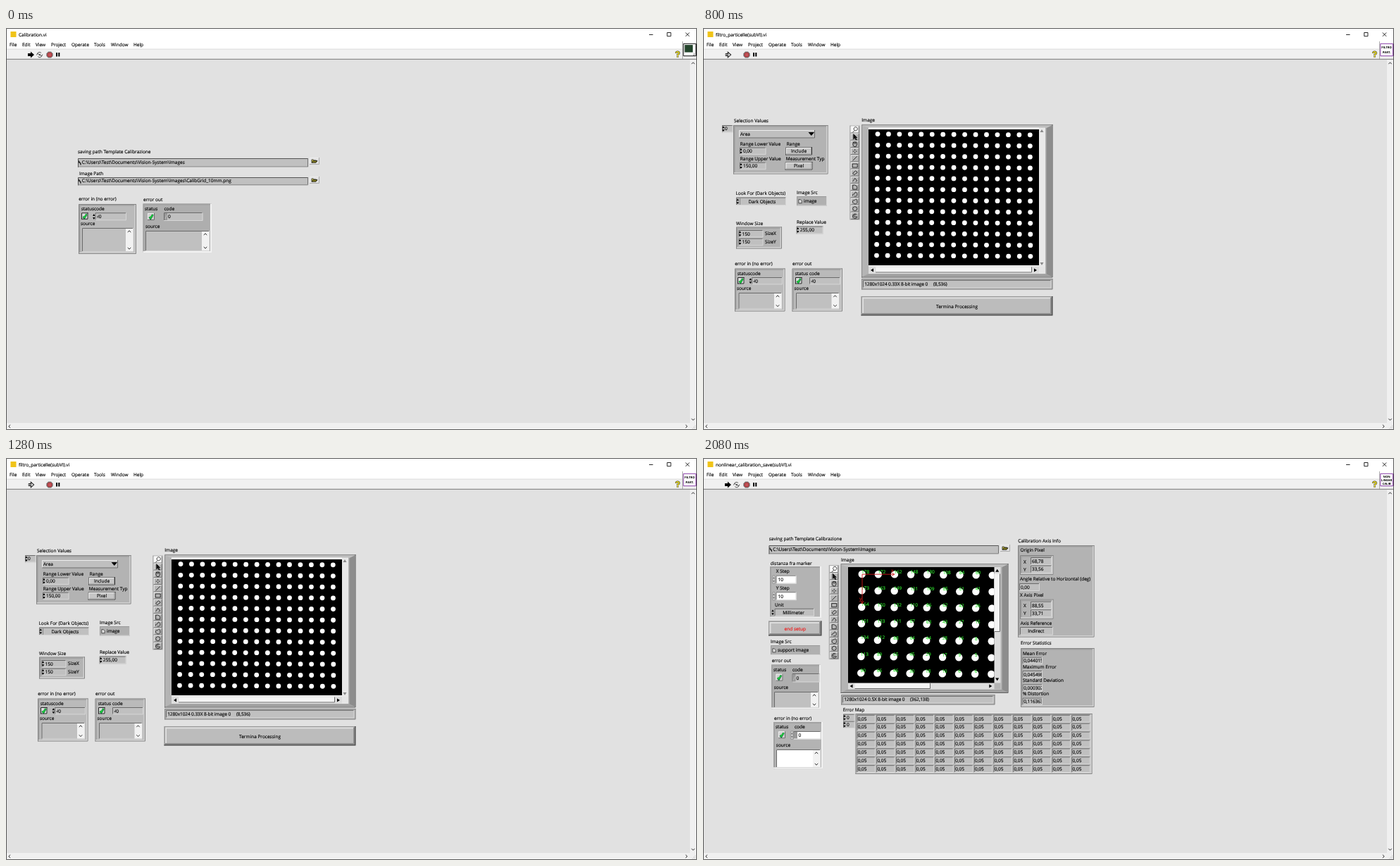
Recreate the animation shown at these times as an HTML page. Size 981 by 571 pixels, loop 2.4 s.

```html
<!DOCTYPE html>
<html lang="en">
<head>
<meta charset="utf-8">
<title>Calibration panels</title>
<style>
html, body { margin: 0; width: 100%; height: 100%; overflow: hidden; background: #fff; }
svg { display: block; }
text { font: 6.5px "Open Sans", "Noto Sans", sans-serif; white-space: pre; text-rendering: geometricPrecision; stroke-width: .14px; }
.status { letter-spacing: -.09px; }
.scene { visibility: hidden; animation: show 2.4s step-end infinite; }
.scene:nth-of-type(2) { animation-delay: -1.6s; }
.scene:nth-of-type(3) { animation-delay: -.8s; }
@keyframes show {
  0% { visibility: visible; }
  33.3333%, 100% { visibility: hidden; }
}
</style>
</head>
<body>
<svg id="stage" width="981" height="571" viewBox="0 0 981 571"></svg>
<script>
const GREY = '#c0c0c0', PANEL = '#b3b3b3', DARK = '#6a6a6a', LIGHT = '#d6d6d6', INK = '#000';
const range = n => [...Array(n).keys()];

// Basic shapes; text is placed by the middle of its capitals
const rect = (l, t, r, b, fill) => `<rect x="${l}" y="${t}" width="${r - l}" height="${b - t}" fill="${fill}"/>`;
const path = (d, stroke = INK, w = 1, fill = 'none') => `<path d="${d}" stroke="${stroke}" stroke-width="${w}" fill="${fill}"/>`;
const shape = (d, fill = INK) => path(d, 'none', 0, fill);
const disc = (x, y, r, fill) => `<circle cx="${x}" cy="${y}" r="${r}" fill="${fill}"/>`;
const text = (x, y, s, fill = INK, attrs = '') => `<text x="${x}" y="${y + 2.3}" fill="${fill}" stroke="${fill}" ${attrs}>${s}</text>`;
const mid = (x, y, s, fill) => text(x, y, s, fill, 'text-anchor="middle"');
const clip = (l, t, r, b, body) =>
  `<svg x="${l}" y="${t}" width="${r - l}" height="${b - t}" viewBox="${l} ${t} ${r - l} ${b - t}">${body}</svg>`;

function bevel(l, t, r, b, fill, tl, br, w = 1) {
  const h = w / 2;
  return rect(l, t, r, b, fill) +
    path(`M${l + h} ${b}V${t + h}H${r}`, tl, w) +
    path(`M${l} ${b - h}H${r - h}V${t}`, br, w);
}
const sunk = (l, t, r, b, fill = GREY) => bevel(l, t, r, b, fill, DARK, LIGHT);
const raised = (l, t, r, b, fill = GREY) => bevel(l, t, r, b, fill, '#eee', DARK);
const ridge = (l, t, r, b, fill = PANEL) =>
  bevel(l, t, r, b, fill, '#858585', '#858585') + bevel(l + 1, t + 1, r - 1, b - 1, fill, '#a0a0a0', '#d0d0d0', 1.5);
const soft = (l, t, r, b, fill = '#aeaeae') => bevel(l, t, r, b, fill, '#a2a2a2', '#f2f2f2', 2);

// Controls
const chevron = (x, y, dx, dy) => path(dx
  ? `M${x - dx} ${y - 2.2}L${x + dx} ${y}L${x - dx} ${y + 2.2}`
  : `M${x - 2.2} ${y - dy}L${x} ${y + dy}L${x + 2.2} ${y - dy}`, '#333', 1);
const spin = (x, y) => shape(`M${x - 1.7} ${y - 1}h3.4l-1.7-3zM${x - 1.7} ${y + 1}h3.4l-1.7 3z`);
const oval = (x, y) => `<rect x="${x - 2}" y="${y - 6}" width="4" height="12" rx="2" fill="#c8c8c8" stroke="#888" stroke-width=".7"/>` +
  shape(`M${x - 1.2} ${y - 1.5}h2.4l-1.2-2zM${x - 1.2} ${y + 1.5}h2.4l-1.2 2z`, '#555');
const field = (l, t, r, b, s, dx = 2, fill = GREY) =>
  sunk(l, t, r, b, fill) + clip(l, t, r - 1, b, text(l + dx, (t + b) / 2, s));
const number = (l, t, r, b, s) => field(l, t, r, b, s, 5) + spin(l + 2, (t + b) / 2);
const button = (l, t, r, b, s) => bevel(l, t, r, b, '#c6c6c6', '#777', '#333') +
  bevel(l + 1, t + 1, r - 1, b - 1, '#c6c6c6', '#eee', '#999') + mid((l + r) / 2, (t + b) / 2, s);
const wide = (l, t, r, b, s, fill) => bevel(l, t, r, b, '#b9b9b9', '#999', '#555', 1.5) +
  bevel(l + 1.5, t + 1.5, r - 1.5, b - 1.5, '#bcbcbc', '#dedede', '#8d8d8d', 2) + mid((l + r) / 2, (t + b) / 2 + .5, s, fill);
const check = (x, y, flat) => (flat
  ? bevel(x, y, x + 9.5, y + 9.5, '#dcdcdc', '#222', '#222')
  : raised(x, y, x + 10, y + 10, '#cfcfcf')) +
  path(`M${x + 2.5} ${y + 5.5}l1.7 2L${x + 7.5} ${y + 2}`, '#063', 2.6) +
  path(`M${x + 2.7} ${y + 5.4}l1.5 1.7L${x + 7.4} ${y + 2.2}`, '#1fd03a', 1.6);
const page = (x, y) => path(`M${x - 2.2} ${y - 2.5}h2.6l1.8 1.8v3.3h-4.4z`, '#333', .8, '#ddd');
const refnum = (l, t, r, b, s) => bevel(l, t, r, b, '#b0b0b0', '#999', LIGHT) + page(l + 5, (t + b) / 2 + .3) + text(l + 10, (t + b) / 2, s);

function filePath(l, t, r, b, s) {
  const y = (t + b) / 2;
  return bevel(l, t, r, b, GREY, '#555', '#666') + path(`M${l + 1} ${b - .2}H${r + .3}V${t}`, LIGHT, .6) +
    path(`M${l + 1.5} ${y - 3}v3h2M${l + 2} ${y - 2}l2.2 5M${l + 4} ${y}v3`, '#222', 1) + text(l + 5.8, y - .6, s);
}
function folder(x, y) {
  return bevel(x, y, x + 14, y + 10, '#e2e2e2', '#eee', '#aaa') +
    path(`M${x + 3} ${y + 7}v-4h2.5l1 1h3v1.5`, '#222', .8, '#d8cf50') +
    path(`M${x + 3} ${y + 7.3}l2-2.6h6l-2 2.6z`, '#111', .8, '#8c8420');
}
function textBox(l, t, r, b, fill = GREY) {
  return sunk(l, t, r + 11, b, fill) + rect(r, t + 1, r + 10.5, b - 1, '#f2f2f2') +
    chevron(r + 5, t + 5, 0, -1.2) + chevron(r + 5, b - 5, 0, 1.2);
}
// Contents shared by all error clusters
function error(title, tx, ty, frame, status, code, led, entry, source, note) {
  return text(tx, ty, title) + frame + text(...status, 'status') + text(...code, 'code') +
    check(...led) + entry + text(...source, 'source') + textBox(...note);
}
const radix = (l, t, r, b) => field(l, t, r, b, '0', 5.2) + path(`M${l + 4.6} ${t + 3.2}v4M${l + 4.4} ${t + 5}l-1.8 1 1.8 1`, '#333', .7);
const shaded = (l, t, r, b) => field(l, t, r, b, '0', 6) + rect(l + 1, t + 1, l + 5, b - 1, '#999') +
  path(`M${l + 2} ${b - 3}l2-5`, '#ccc', .7);

// Image display parts
const glyphs = [
  'M-3.5 4l3-3M-.8.7A2.6 2.6 0 1 1 1 1.4 2.6 2.6 0 0 1-.8.7', 'M-2-4v7l2-1.5 1.5 3 1-.5-1.5-3h2z',
  'M-3 0l1-3h4l1 3-1.5 3.5h-3zM-1-3v3M1-3v3', 'M-3 0h2M1 0h2M0-3v2M0 1v2', 'M-3 3l6-6',
  'M-3.5-2.5h7v5h-7z', 'M-3 .5L1-3 3.5-.5-1 3z', 'M-3 2L0-2.5 3 1 1 2.5', 'M-3-3h3l3 2v4h-6z',
  'M-3 2C-4-2 0 1 0-2S4-2 3 1 0 2-1 3', 'M-3 1C-4-3 0-1 1-3S4 0 3 2-2 4-3 1', 'M-3 0a3 3 0 1 0 6 0a3 3 0 1 0-6 0',
  'M2.5-2A3.3 3.3 0 1 0 3.3 1.3H0A1.5 1.5 0 1 1 1-1'];
const palette = (x, y) => rect(x - 7.5, y - 6, x + 7, y + 128, '#a9a9a9') + glyphs.map((d, i) =>
  raised(x - 6, y + i * 10.2 - 5, x + 6, y + i * 10.2 + 5, i ? '#b5b5b5' : '#fff') +
  `<g transform="translate(${x} ${y + i * 10.2})">${path(d, '#111', .8, i == 1 ? '#111' : 'none')}</g>`).join('');
function display(l, t, r, b) {
  return bevel(l, t, r, b, '#b4b4b4', '#8a8a8a', '#5e5e5e') +
    shape(`M${r - 9} ${t + 5}L${r - 1} ${t + 1}V${b - 1}L${r - 9} ${b - 5}z`, '#8d8d8d') +
    shape(`M${l + 1} ${b - 1}L${l + 9} ${b - 5}H${r - 9}L${r - 1} ${b - 1}z`, '#a0a0a0') +
    shape(`M${l + 1} ${t + 1}H${r - 1}L${r - 9} ${t + 5}H${l + 9}z`, '#bdbdbd');
}
const arrow = (x, y, turn, fill = INK) => `<path d="M-2-2.5L2 0-2 2.5z" fill="${fill}" transform="translate(${x} ${y}) rotate(${turn})"/>`;
const info = (l, t, r, b, s, x, pos) => bevel(l, t, r, b, '#b0b0b0', '#888', '#888') +
  sunk(l + 2, t + 2, r - 2, b - 2) + [[l + 4.2, s], [x, pos]].map(([x, s]) =>
    text(x, (t + b) / 2 - .3, s, INK, 'class="status"')).join('');

// Window frame and toolbar
function chrome() {
  const menu = { File: 5, Edit: 23, View: 42, Project: 64, Operate: 93, Tools: 125, Window: 149, Help: 181 };
  return rect(0, 0, 981, 571, '#fff') + rect(1, 30, 980, 44, '#f0f0f0') + rect(1, 29.6, 960, 30.4, '#d4d4d4') +
    rect(0, 44, 981, 570, '#e1e1e1') + rect(0, 43.8, 981, 44.8, '#777') +
    rect(971, 45, 980, 561, '#f0f0f0') + rect(1, 561, 980, 570, '#f0f0f0') +
    rect(6.5, 5, 14.5, 13, '#f0c419') +
    Object.entries(menu).map(([s, x]) => text(x, 23.6, s)).join('') +
    path('M913 9.5h5.5M938.7 6.5h5.2v5.2h-5.2zM964.8 6.5l5.4 5.4M970.2 6.5l-5.4 5.4', '#111', .9) +
    shape('M60 33.5h4l2.7 2.7v3.6l-2.7 2.7h-4l-2.7-2.7v-3.6z', '#777') + disc(62, 38, 3.6, '#b2393f') +
    path('M60 37h4M60 39h4', '#d98a8c', .7) + rect(71, 35, 73, 40.5, INK) + rect(74.3, 35, 76.3, 40.5, INK) +
    path('M951.3 35.8q.2-2 2.2-2t2.1 1.9q0 1-2 2.3v1.2M953.5 40v1.6', '#222', 2.6) +
    path('M951.3 35.8q.2-2 2.2-2t2.1 1.9q0 1-2 2.3v1.2M953.5 40v1.6', '#f5e51b', 1.5) +
    path('M960.5 19V44', '#999', .8) +
    chevron(975.5, 50, 0, -1.2) + chevron(975.5, 556, 0, 1.2) + chevron(5, 565.8, -1.2) + chevron(966, 565.8, 1.2) +
    range(3).map(i => range(i + 1).map(j => rect(978 - 2 * j, 564.5 + 2 * i, 979 - 2 * j, 565.5 + 2 * i, '#bbb')).join('')).join('') +
    path('M.5.5H980.5V570.5H.5z', '#555');
}
const run = shape('M31 36h4v-2.5l5 4.5-5 4.5V40h-4z') +
  path('M44.5 36.5a3.2 3.2 0 0 1 5.5-1M51 39a3.2 3.2 0 0 1-5.7 1.5M43.5 38.5l1-2.2 2.2 1M51.8 37.5l-1 2-2.2-.8', '#444', .9) + disc(47.8, 38, 1.3, '#555');
const running = path('M31.8 36.5h3.5v-2.3l4.3 3.8-4.3 3.8v-2.3h-3.5M31.5 38h5', '#222', 1.1);
const badge = (edge, ...lines) => path('M961.8 22.3h17.7v17.4h-17.7z', edge, 1, '#fff') + lines.map((s, i) =>
  `<text x="970.6" y="${32.6 + (i - (lines.length - 1) / 2) * (lines.length > 2 ? 5 : 7)}" text-anchor="middle" style="font-size:4.2px;font-weight:700">${s}</text>`).join('');

const docs = 'C:\\Users\\Test\\Documents\\Vision-System\\Images';

function setup() {
  return text(18, 9.5, 'Calibration.vi') + run + badge('#111') + rect(963.5, 24, 975, 34.5, '#24452c') +
    '<text x="975.5" y="38.6" style="font-size:4.5px">2</text>' +
    text(102, 175.5, 'saving path Template Calibrazione') + filePath(102, 185, 429, 197.7, docs) + folder(431, 184) +
    text(104, 206.2, 'Image Path') + filePath(102, 212, 429, 223.3, docs + '\\CalibGrid_10mm.png') + folder(431, 211) +
    error('error in (no error)', 103.3, 243, ridge(103, 250, 185, 321, '#bababa'), [106.7, 256.7], [125, 256.7],
      [107, 262.3, 1], radix(126.5, 262.3, 171, 273.3) + spin(124.8, 268), [106, 277.6], [108, 284, 170, 318]) +
    error('error out', 195, 243.7, soft(194.5, 249.5, 292, 319), [197, 256.7], [224.5, 256.2],
      [201, 263], shaded(224, 262, 279.5, 274), [198, 281.6], [198, 288, 278, 317]);
}

function filter() {
  const dots = range(12).map(r => range(15).map(c =>
    disc(248 + c * 15.45 - r * (.14 - c * .014), 150.6 + r * 15.68 + c * .09, 3.4, '#fff')).join('')).join('');
  return text(18, 9.5, 'filtro_particelle(subVI).vi') + running + badge('#8a3fa8', 'FILTRO', 'PART.') +
    text(44, 131.7, 'Selection Values') + number(27, 138, 42.5, 148.3, '') + text(31, 142.8, '0') +
    ridge(43, 138, 177.5, 207.5) +
    raised(51, 145, 159, 156.5, '#bfbfbf') + text(53, 150.7, 'Area') + shape('M149.5 148h8.5l-4.2 5z') +
    text(52.8, 164.3, 'Range Lower Value') + number(52, 169.5, 89.5, 180, '0,00') +
    text(118.8, 164.3, 'Range') + button(117, 169, 155, 180.5, 'Include') +
    text(52.8, 185.3, 'Range Upper Value') + number(52, 190.7, 89.5, 201.2, '150,00') +
    clip(110, 180, 172.5, 191, text(117.7, 185.3, 'Measurement Type')) + button(116.5, 190, 155.5, 201.5, 'Pixel') +
    text(46.5, 234.4, 'Look For (Dark Objects)') + sunk(47, 240.5, 118, 252) + rect(52, 241.5, 53, 251, '#888') +
    spin(49.3, 246.2) + mid(84, 246.2, 'Dark Objects') +
    text(133, 233.6, 'Image Src') + refnum(133, 239, 176, 252.7, 'image') +
    text(47, 277.7, 'Window Size') + ridge(47, 282.5, 112, 313.5) +
    number(50.5, 287, 85.5, 297.5, '150') + text(88, 292, 'SizeX') +
    number(50.5, 298.7, 85.5, 309.2, '150') + text(88, 303.6, 'SizeY') +
    text(133, 275.3, 'Replace Value') + number(132.7, 281.5, 170.5, 292.5, '255,00') +
    error('error in (no error)', 45.3, 335, ridge(45, 341.5, 116.5, 402.5, '#bababa'), [48.7, 348.6], [67, 348.6],
      [49, 354, 1], radix(69, 354, 113, 364.5) + spin(67.3, 359.3), [48, 369.6], [50.5, 376, 101, 399.5]) +
    error('error out', 127, 335, ridge(126.5, 341.5, 198, 402.5, '#bababa'), [130.7, 348.6], [151, 348.6],
      [131, 354, 1], radix(151, 354, 195, 364.5), [129.5, 369.6], [132, 376, 182.5, 399.5]) +
    palette(215.7, 144.5) + text(225.3, 131, 'Image') + display(225, 137, 496.5, 354.5) +
    rect(235, 141.5, 486, 349, '#e6e6e6') + rect(235, 141.5, 477, 144, '#fff') + rect(235, 144, 477, 337, '#000') + dots +
    rect(477, 142, 485.5, 339, '#e9e9e9') + arrow(481, 146, -90, '#888') + arrow(481, 335, 90, '#888') +
    rect(235, 339, 477, 348.5, '#ddd') + raised(245, 339.5, 467, 347.5, '#f4f4f4') + arrow(240, 344, 180) + arrow(472, 344, 0) +
    info(225, 356, 496.5, 371.5, '1280x1024 0.33X 8-bit image 0', 327, '(8,536)') +
    wide(224.5, 381, 496.5, 408.5, 'Termina Processing');
}

function calibrate() {
  const base = [178, 172, 162, 148, 130, 108, 84, 60, 40, 24, 12, 4, 0, 0];
  const grid = range(7).map(r => range(9).map(c => {
    const x = 225.7 + c * 23.13 - r * .25, y = 165 + r * 23.4 + c * .2;
    return disc(x, y, 5.2, '#fff') + (c < 8 ? text(x - .7, y - 3.8, base[r + c] + r, '#2fe62f') : '');
  }).join('')).join('');
  const axes = path('M271.5 165.2H226V207', '#d01818', .9) + path('M268 163l3.8 2.2-3.8 2.2M223.8 203l2.2 4 2.2-4', '#d01818', .8) +
    text(267, 159.5, 'x', '#d01818') + text(222, 199.5, 'y', '#d01818');
  const map = range(7).map(r => range(12).map(c => {
    const x = 218.5 + c * 27.72, y = 364.8 + r * 11.9;
    return field(x, y, x + 26.3, y + 10.8, '0,05', 1.2);
  }).join('')).join('');
  const pair = (t, a, b) => ridge(450, t, 497.5, t + 28) + text(455, t + 9.3, 'X') + field(465, t + 3, 495, t + 14, a) +
    text(455, t + 20.3, 'Y') + field(465, t + 14.5, 495, t + 25.5, b);
  const stats = [['Mean Error', '0,0440157'], ['Maximum Error', '0,0454983'], ['Standard Deviation', '0,0003028'], ['% Distortion', '0,1163635']]
    .map(([s, v], i) => text(454, 277.2 + i * 19.3, s) + field(453.5, 282.7 + i * 19.3, 482, 293.2 + i * 19.3, v, 1.7)).join('');
  const step = (t, s) => text(103.8, t, s) + field(103.5, t + 5.7, 132.5, t + 17.5, '10', 3, '#fff') + oval(100.5, t + 11.7);
  return text(18, 9.5, 'nonlinear_calibration_save(subVI).vi') + run + badge('#8a3fa8', 'NON', 'LINEAR', 'CALIB') +
    text(93.7, 114.6, 'saving path Template Calibrazione') + filePath(93.5, 124, 420, 136.3, docs) + folder(422, 123) +
    text(95.7, 149.2, 'distanza fra marker') + soft(95, 154, 168, 227.5, PANEL) + step(161, 'X Step') + step(184.6, 'Y Step') +
    text(102, 208.4, 'Unit') + sunk(101.5, 213.7, 158, 225) + spin(99, 219.2) + mid(128.5, 219.2, 'Millimeter') +
    wide(93, 231.5, 168.5, 252.5, 'end setup', '#f01414') +
    text(96, 260.6, 'Image Src') + refnum(96, 266, 167, 280, 'support image') +
    error('error out', 97.7, 288, soft(97, 293.5, 167, 356.5), [100, 300.6], [127, 300.2],
      [103.5, 306.7], shaded(126.5, 306, 165.5, 318.5), [100.7, 326], [101, 332, 153, 355]) +
    error('error in (no error)', 101, 369.6, soft(100, 375, 170, 441.5, PANEL), [103, 382], [130, 381.6],
      [107, 388.3], field(128, 388, 167.5, 399.5, '0', 7.5, '#fff') + rect(129, 389, 134, 398.5, '#999') + oval(126.3, 393.7),
      [103.8, 407.6], [104, 414, 156, 440, '#fff']) +
    palette(186.2, 158.1) + text(196, 144.6, 'Image') + display(195.5, 150, 433.5, 334) +
    rect(206, 155, 422.5, 328.5, '#ddd') + rect(413.5, 319.5, 422.5, 328.5, PANEL) +
    rect(206, 155, 413.5, 319.5, '#000') + clip(206, 155, 413.5, 319.5, grid + axes) +
    raised(413.5, 164.5, 422, 247, '#f4f4f4') + arrow(417.7, 159.7, -90) + arrow(417.7, 314.5, 90) +
    raised(215.5, 320, 323, 328, '#f4f4f4') + arrow(210.5, 324, 180) + arrow(408.3, 324, 0) +
    info(196, 336, 414.5, 350.5, '1280x1024 0.5X 8-bit image 0', 294, '(362,138)') +
    text(198.7, 357.6, 'Error Map') + number(199, 363.7, 215.5, 374, '0') + number(199, 373.7, 215.5, 384, '0') +
    ridge(216.5, 363, 552.5, 449) + map +
    text(447.3, 117.7, 'Calibration Axis Info') + ridge(447, 124, 555.5, 254.5) +
    text(450.5, 131, 'Origin Pixel') + pair(138, '68,78', '33,56') +
    text(450, 171.7, 'Angle Relative to Horizontal (deg)') + field(449, 178, 478, 189, '0,00') +
    text(450, 194.6, 'X Axis Pixel') + pair(200.7, '88,55', '33,71') +
    text(450.7, 234.6, 'Axis Reference') + sunk(450, 240, 497, 251.5) + mid(472.7, 245.7, 'Indirect') +
    text(451, 263, 'Error Statistics') + ridge(451, 270, 555.5, 354) + stats;
}

document.getElementById('stage').innerHTML = chrome() +
  [setup, filter, calibrate].map(draw => `<g class="scene">${draw()}</g>`).join('');
</script>
</body>
</html>
```
